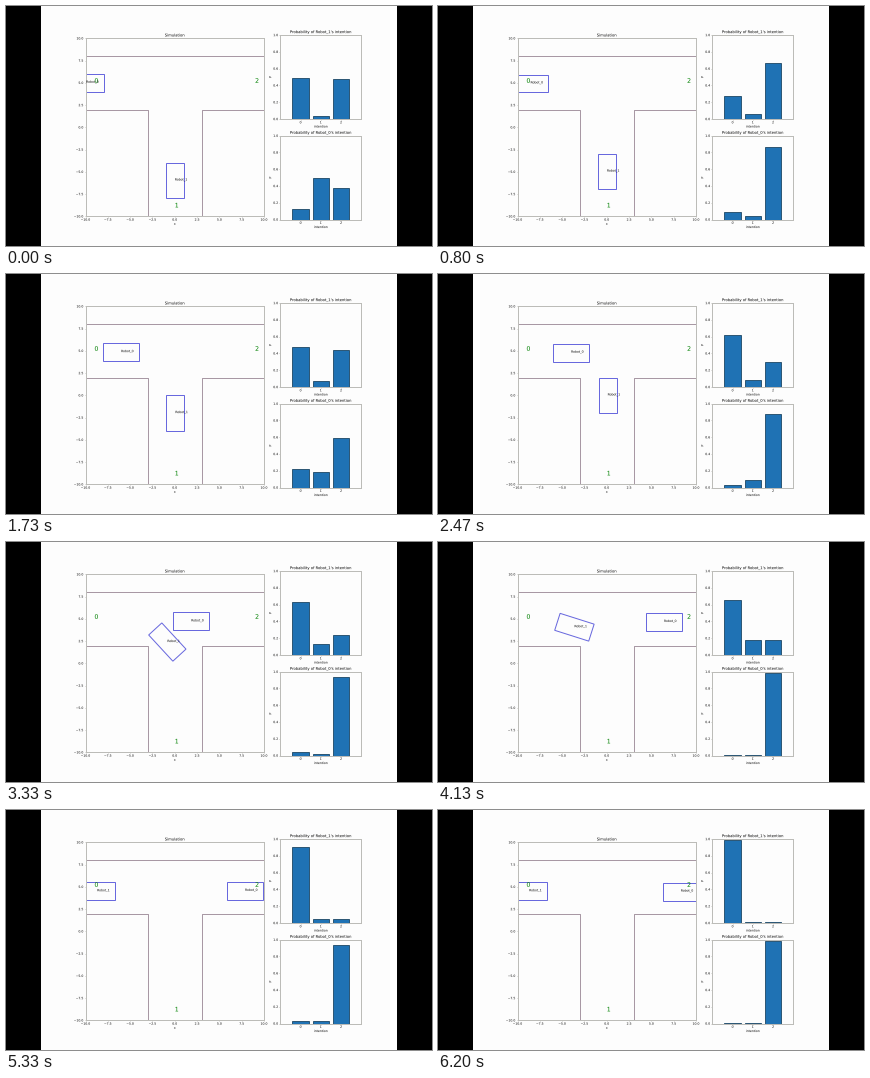
These frames come from a looping animation (426 by 240 pixels, 6270 ms). A matplotlib script:

```python
import numpy as np
import matplotlib.pyplot as plt
from matplotlib.animation import FuncAnimation
from matplotlib.patches import Polygon, Rectangle
from matplotlib.patheffects import Normal
from matplotlib.transforms import IdentityTransform

W, H, DPI = 426, 240, 72  # at 72 dpi one point is one pixel
FRAMES, INTERVAL = 95, 66
PT = 0.311                # pixels per nominal point of text

PAGE, SPINE, ROAD, BOX = "#fdfdfd", "#bcbcb8", "#a898a4", "#6868de"

plt.rcParams.update({
    "path.effects": [Normal()],  # draws text as outlines, crisp at tiny sizes
    "font.family": "DejaVu Sans", "text.hinting": "none",
    "font.size": 10 * PT, "axes.titlesize": 12 * PT, "axes.titlepad": 6 * PT,
    "axes.labelsize": 10 * PT, "axes.labelpad": 4 * PT,
    "axes.facecolor": PAGE, "axes.edgecolor": SPINE, "axes.linewidth": 1,
    "xtick.color": SPINE, "ytick.color": SPINE,
    "xtick.labelcolor": "black", "ytick.labelcolor": "black",
    "xtick.labelsize": 10 * PT, "ytick.labelsize": 10 * PT,
    "xtick.major.size": 1, "ytick.major.size": 1,
    "xtick.major.pad": 1.1, "ytick.major.pad": 1.1,
})

# steps at which the robots change pace, and the distance each has covered
STEPS = np.array([0, 12, 26, 37, 62, 80, 94])
TRAVEL = [np.array([0, 1.39, 3.91, 5.93, 16.34, 17.8, 18.25]),
          np.array([0, 1.0, 3.98, 5.96, 12.33, 16.98, 16.98])]

# belief in each robot's true goal at the same steps
GOAL = [2, 0]
BELIEF = [[.38, .865, .595, .88, .99, .94, .99],
          [.49, .275, .48, .62, .65, .905, .99]]


def smooth(t, ts, vs):
    """Monotone cubic through the points (ts, vs)."""
    d = np.diff(vs) / np.diff(ts)
    m = np.concatenate(([d[0]], np.zeros(len(d) - 1), [d[-1]]))
    for i in range(1, len(d)):
        if d[i - 1] * d[i] > 0:
            m[i] = 2 * d[i - 1] * d[i] / (d[i - 1] + d[i])
    i = min(np.searchsorted(ts, t, side="right") - 1, len(d) - 1)
    h = ts[i + 1] - ts[i]
    u = (t - ts[i]) / h
    return (vs[i] * (1 + 2 * u) * (1 - u) ** 2 + m[i] * h * u * (1 - u) ** 2
            + vs[i + 1] * u * u * (3 - 2 * u) + m[i + 1] * h * u * u * (u - 1))


def crossing(s, k):
    """Straight through from the left, drifting slightly down."""
    return s - 9.93, 5 - 0.0058 * k, 0


def turning(s, k, start=6.18, bend=8.7, a=6.7, b=4.3):
    """Up the side road, a quarter ellipse to the left, then straight."""
    q = np.clip((s - start) / bend, 0, 1) * np.pi / 2
    x = 0.1 * min(s / start, 1) - a * (1 - np.cos(q)) - max(s - start - bend, 0)
    y = min(s, start) - 5.98 + b * np.sin(q)
    return x, y, np.arctan2(b * np.cos(q), -a * np.sin(q))


def corners(x, y, angle, length=4, width=2):
    c, s = np.cos(angle), np.sin(angle)
    unit = np.array([(-.5, -.5), (.5, -.5), (.5, .5), (-.5, .5)])
    return unit * (length, width) @ [[c, s], [-s, c]] + (x, y)


def beliefs(robot, k):
    """Probabilities of the three intentions; they always sum to one."""
    p = np.interp(k, STEPS, BELIEF[robot])
    if robot == 0:
        share = 0.5 + 0.3 * np.cos(2 * np.pi * k / 36)
    else:
        share = 0.07 + 0.43 * min(k / 62, 1) ** 2
    probs = [(1 - p) * (1 - share), (1 - p) * share, (1 - p) * (1 - share)]
    probs[GOAL[robot]] = p
    return probs


fig = plt.figure(figsize=(W / DPI, H / DPI), dpi=DPI, facecolor="black")
fig.add_artist(Rectangle((35, 0), 356, H, color=PAGE, lw=0, zorder=-1,
                         transform=IdentityTransform()))


def panel(left, top, right, bottom, title, xlabel):
    ax = fig.add_axes([left / W, 1 - bottom / H,
                       (right - left) / W, (bottom - top) / H])
    ax.set_title(title)
    ax.set_xlabel(xlabel)
    return ax


def belief_panel(robot, top, bottom):
    ax = panel(274.3, top, 355.3, bottom,
               f"Probability of Robot_{robot}'s intention", "intention")
    ax.set(xlim=(-1, 3), ylim=(0, 1), xticks=[0, 1, 2], ylabel="P")
    return ax.bar([0, 1, 2], [0, 0, 0], width=0.8, color="#1f72b4",
                  edgecolor="#16405e", lw=0.8)


road = panel(79.5, 32.3, 258, 210.3, "Simulation", "x")
ticks = np.arange(-10, 10.1, 2.5)
road.set(xlim=(-10, 10), ylim=(-10, 10), xticks=ticks, yticks=ticks)
for xs, ys in [((-10, 10), (8, 8)), ((-10, -3, -3), (2, 2, -10)),
               ((10, 3, 3), (2, 2, -10))]:
    road.plot(xs, ys, color=ROAD, lw=1)
for goal, (x, y) in enumerate([(-9, 5), (0, -9), (9, 5)]):
    road.text(x, y, str(goal), color="green", size=20 * PT)

bars = [belief_panel(0, 129.7, 213.5), belief_panel(1, 29, 113)]
routes = [crossing, turning]
boxes = [road.add_patch(Polygon(corners(0, 0, 0), fill=False, ec=BOX, lw=1))
         for _ in routes]
names = [road.text(0, 0, f"Robot_{i}") for i in range(len(routes))]


def update(k):
    for i, route in enumerate(routes):
        x, y, angle = route(smooth(k, STEPS, TRAVEL[i]), k)
        boxes[i].set_xy(corners(x, y, angle))
        names[i].set_position((x, y))
        for rect, p in zip(bars[i], beliefs(i, k)):
            rect.set_height(p)
    return [*boxes, *names, *bars[0], *bars[1]]


anim = FuncAnimation(fig, update, frames=FRAMES, interval=INTERVAL,
                     repeat=True, repeat_delay=0, blit=False)
plt.show()
```
